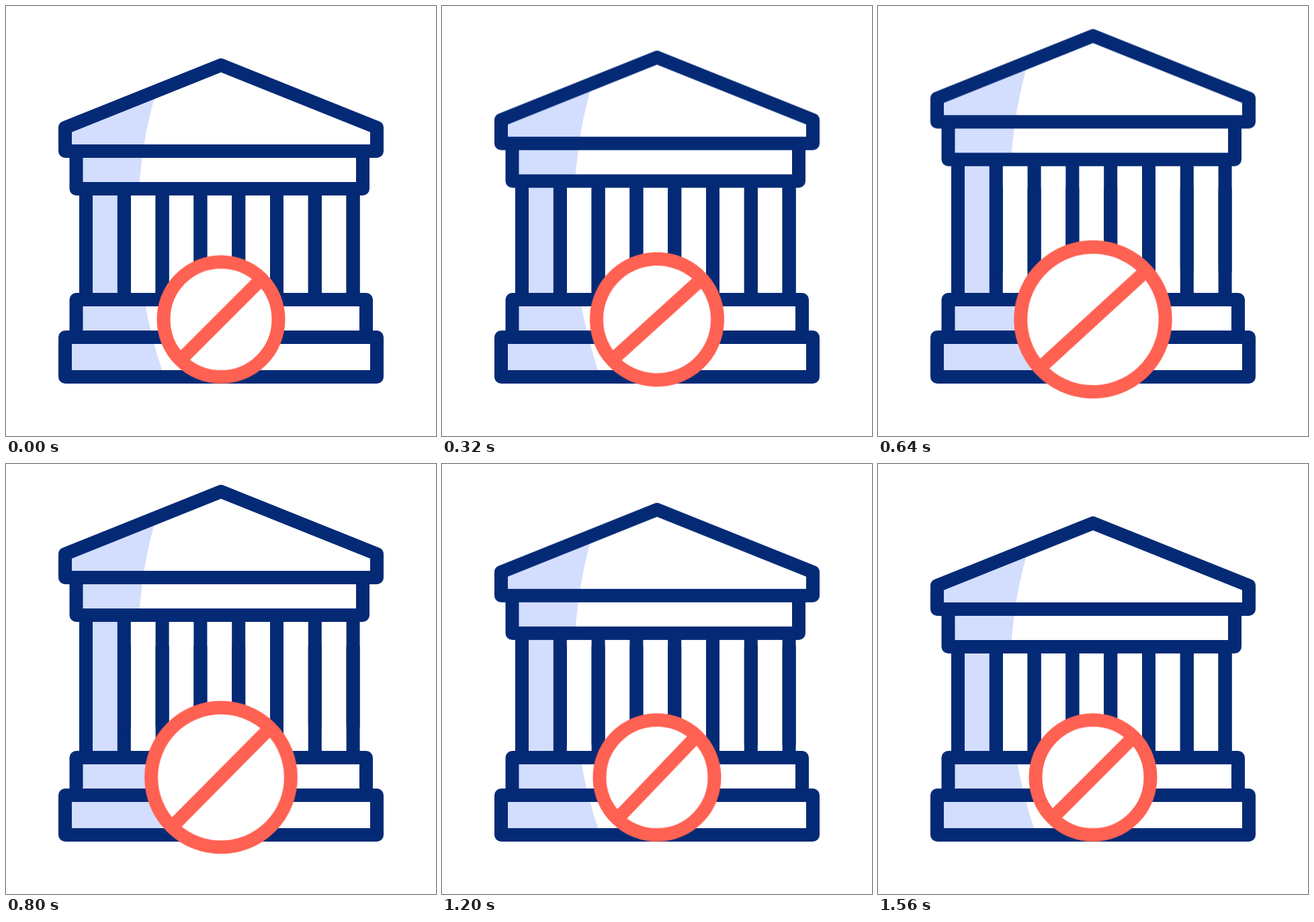
Write an HTML page that moves like this. It is 640x640 px and loops after 1.64 s.

```html
<!DOCTYPE html>
<html lang="en">
<head>
<meta charset="utf-8">
<title>Bank blocked</title>
<style>
  html, body { margin: 0; width: 100%; height: 100%; overflow: hidden; background: #fff; }
  svg { display: block; width: 100vw; height: 100vh; }

  .ink { fill: none; stroke: #042a76; stroke-width: 20; stroke-linecap: round; stroke-linejoin: round; }
  .shade { fill: #d3ddfe; }
  .sign { fill: #fff; stroke: #ff6152; stroke-width: 20; }
  .sign * { vector-effect: non-scaling-stroke; }

  .roof, .tilt, .grow { animation: 1640ms infinite; }
  .roof { animation-name: lift; }
  .tilt { animation-name: tilt; animation-timing-function: cubic-bezier(.33, 0, .67, 1); }
  .grow { animation-name: grow; animation-timing-function: cubic-bezier(.5, 0, .5, 1); }

  @keyframes lift {
    0%, 2.439% { transform: translateY(0); animation-timing-function: cubic-bezier(.52, 0, .5, 1); }
    48.78% { transform: translateY(-47px); animation-timing-function: cubic-bezier(.5, 0, .48, 1); }
    95.122%, 100% { transform: translateY(0); }
  }
  @keyframes tilt {
    0% { transform: rotate(0deg); }
    26.83%, 31.71% { transform: rotate(3.5deg); }
    60.98% { transform: rotate(-2.5deg); }
    85.37%, 100% { transform: rotate(0deg); }
  }
  @keyframes grow {
    0%, 9.756% { transform: scale(1); }
    39.024% { transform: scale(1.26); }
    70.732%, 100% { transform: scale(1); }
  }
</style>
</head>
<body>
<svg viewBox="0 0 640 640">
  <defs>
    <g id="columns">
      <path class="shade" d="M119 272H176V437H119Z"/>
      <path class="ink" d="M119 272V437M175.8 272V437M232.6 272V437M289.4 272V437M346.2 272V437M403 272V437M459.8 272V437M516.6 272V437"/>
    </g>
  </defs>

  <!-- The fixed and the lifted columns overlap, so they seem to stretch. -->
  <use href="#columns"/>
  <g class="roof">
    <use href="#columns"/>
    <path fill="#fff" d="M88 216V181L320 88L552 181V216H531V272H104.5V216Z"/>
    <path class="shade" d="M88 216V181L224 126.500Q204 190 198 272H104.500V216Z"/>
    <path class="ink" d="M88 216V181L320 88L552 181V216ZM104.500 216V272H531V216"/>
  </g>

  <path fill="#fff" d="M104.500 437H536V493H552V552H88V493H104.500Z"/>
  <path class="shade" d="M104.500 437H206Q215 493 235.500 552H88V493H104.500Z"/>
  <path class="ink" d="M104.500 493V437H536V493M88 493H552V552H88Z"/>

  <g transform="translate(320 466.500)">
    <g class="tilt">
      <g class="sign grow">
        <circle r="85.500"/>
        <path d="M-59 59L59 -59"/>
      </g>
    </g>
  </g>
</svg>
</body>
</html>
```
